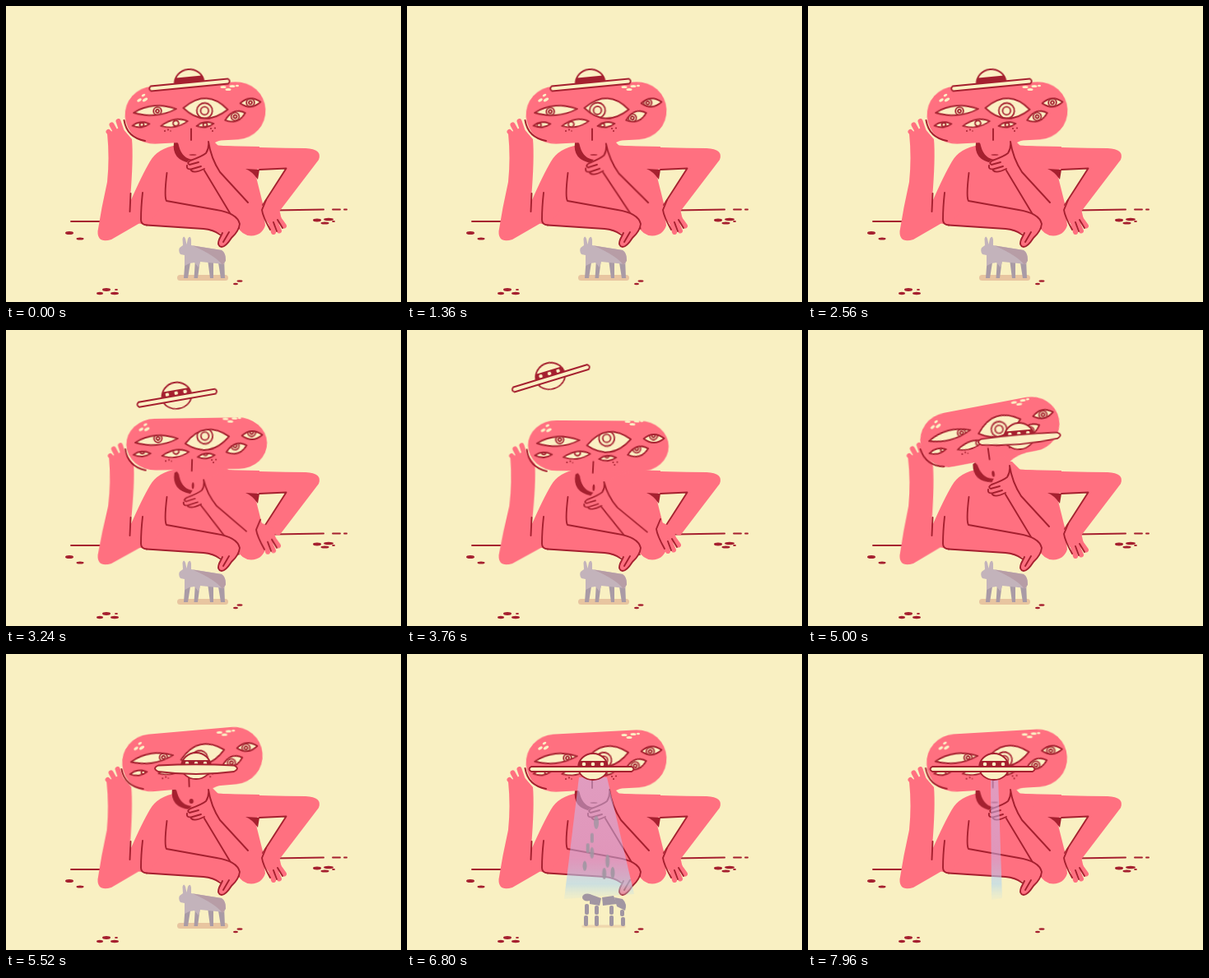
An HTML page without scripts that plays this animation: 480x360 px, repeating every 8000 ms.

```html
<!DOCTYPE html>
<html lang="en">
<head>
<meta charset="utf-8">
<title>The thinker and the saucer</title>
<style>
html, body { margin: 0; width: 100%; height: 100%; overflow: hidden; background: #f9f0c2; }
svg { display: block; width: 100vw; height: 100vh; }
.pink { fill: #ff7080; }
.red { fill: #a5202f; }
.cream { fill: #fbf0c4; }
.line { fill: none; stroke: #a5202f; stroke-width: 1.9; stroke-linecap: round; stroke-linejoin: round; }
.edge { stroke: #a5202f; stroke-width: 1.8; stroke-linejoin: round; }
.finger { fill: none; stroke: #ff7080; stroke-width: 6; stroke-linecap: round; stroke-linejoin: round; }
.stone { fill: #a196a2; }

/* every part shares one 8 s clock */
.head, .pill, .arm, .chin, .palm, .ufo, .brim, .belly, .lights, .mouth, .beam,
.look-l, .look-r, .tilt, .blink, .horse, .pieces, .shade { animation: 8s ease-in-out infinite; }

.head { animation-name: head; transform-origin: 230px 130px; }
@keyframes head {
  0%, 33% { transform: translate(0, 0) rotate(0); }
  36% { transform: translate(1px, 7px) rotate(1deg); }
  43% { transform: translate(2px, 9px) rotate(2deg); }
  47%, 49.5% { transform: translate(2.5px, 11px) rotate(3deg); }
  53.5%, 64.4% { transform: translate(-9px, -6px) rotate(-8deg); }
  69% { transform: translate(-3.5px, -2px) rotate(-2deg); }
  74%, 85% { transform: translate(0, 0) rotate(0); }
  90% { transform: translate(-1px, -1px) rotate(-.8deg); }
  100% { transform: translate(-.5px, -.5px) rotate(-.3deg); }
}
.pill { animation-name: pill; transform-origin: 230px 130px; }
@keyframes pill {
  0%, 33%, 69%, 100% { transform: scaleY(1); }
  43%, 49.5% { transform: scaleY(.88); }
  53.5%, 64.4% { transform: scaleY(.95); }
}

.arm { animation-name: arm; transform-origin: 120px 278px; }
@keyframes arm {
  0%, 33%, 74%, 100% { transform: rotate(0); }
  43%, 49.5% { transform: rotate(1.2deg); }
  53.5%, 64.4% { transform: rotate(-.7deg); }
}

.chin { animation-name: chin; transform-origin: 297px 258px; }
@keyframes chin {
  0%, 1%, 11%, 22%, 32%, 33% { transform: translate(0, 0) rotate(0) scale(1, 1); }
  6%, 17%, 27% { transform: translate(0, 0) rotate(-2.6deg) scale(1, 1); }
  43%, 49.5% { transform: translate(-1px, 4px) rotate(-4deg) scale(1, .87); }
  53.5%, 64.4% { transform: translate(-1px, 0) rotate(0) scale(1, 1); }
  69%, 100% { transform: translate(0, 0) rotate(0) scale(1, 1); }
}

.palm { animation-name: palm; }
@keyframes palm {
  0%, 33%, 53.5%, 100% { transform: translate(0, 0); }
  43%, 49.5% { transform: translate(-8px, -6px); }
}

.ufo { animation-name: ufo; animation-timing-function: linear; }
@keyframes ufo {
  0%, 33% { transform: translate(223px, 96px) rotate(-5.5deg); }
  36% { transform: translate(222px, 102px) rotate(-4deg); }
  39% { transform: translate(215px, 88px) rotate(-8deg); }
  43% { transform: translate(196px, 74px) rotate(-13deg); }
  47% { transform: translate(174.8px, 58.8px) rotate(-17deg); }
  48.5% { transform: translate(180px, 55px) rotate(-13deg); }
  51% { transform: translate(245px, 53px) rotate(3deg); }
  53.5% { transform: translate(322px, 57px) rotate(13deg); }
  55% { transform: translate(340px, 62.8px) rotate(15deg); }
  56.5% { transform: translate(345px, 70px) rotate(9deg); }
  58.5% { transform: translate(328px, 94px) rotate(-3deg); }
  61% { transform: translate(278px, 125px) rotate(-8deg); }
  64% { transform: translate(236px, 139px) rotate(-2deg); }
  66% { transform: translate(229px, 141px) rotate(1deg); }
  69% { transform: translate(231px, 139px) rotate(0); }
  74%, 100% { transform: translate(226px, 140px) rotate(0); }
}

.brim { animation-name: brim; }
@keyframes brim {
  0%, 47% { d: path("M-47 -3Q0 -3 47 -3Q51 0 47 3Q0 3 -47 3Q-51 0 -47 -3Z"); }
  55% { d: path("M-47 -3Q0 -5 47 -3Q53 0 47 3Q0 6 -47 3Q-53 0 -47 -3Z"); }
  64%, 69% { d: path("M-46 -3.5Q0 -6 46 -3.5Q54 0 46 4Q0 10 -46 4Q-54 0 -46 -3.5Z"); }
  74%, 100% { d: path("M-75 -3Q0 -3 47 -3Q52 0 47 3Q0 3 -75 3Q-80 0 -75 -3Z"); }
}
.belly { animation-name: belly; }
@keyframes belly {
  0%, 34% { transform: scaleY(0); }
  40%, 100% { transform: scaleY(1); }
}
.lights { animation-name: lights; }
@keyframes lights {
  0%, 36% { opacity: 0; }
  40%, 100% { opacity: 1; }
}

.mouth { animation-name: mouth; }
@keyframes mouth {
  0%, 33%, 76%, 100% { rx: 4.6px; ry: .8px; }
  38%, 60% { rx: 1.4px; ry: 4px; }
  67%, 70% { rx: 2.6px; ry: 2.9px; }
}

/* --k scales a glance to the width of its eye */
.look-l { animation-name: look-l; }
@keyframes look-l {
  0%, 12%, 31%, 33% { transform: translate(0, 0); }
  14%, 18% { transform: translate(calc(var(--k) * -9px), 0); }
  21%, 25% { transform: translate(calc(var(--k) * 8px), 0); }
  38%, 49% { transform: translate(calc(var(--k) * -1px), -3px); }
  53.5%, 58% { transform: translate(calc(var(--k) * 15px), -1px); }
  64%, 100% { transform: translate(calc(var(--k) * 10px), 0); }
}
.look-r { animation-name: look-r; }
@keyframes look-r {
  0%, 12%, 31%, 33% { transform: translate(0, 0); }
  14%, 18% { transform: translate(calc(var(--k) * -9px), 0); }
  21%, 25% { transform: translate(calc(var(--k) * 8px), 0); }
  38%, 49% { transform: translate(calc(var(--k) * -1px), calc(var(--k) * -7px)); }
  53.5%, 58% { transform: translate(calc(var(--k) * 16px), calc(var(--k) * -2px)); }
  64%, 100% { transform: translate(calc(var(--k) * -3px), 1px); }
}
.tilt { animation-name: tilt; }
@keyframes tilt {
  0%, 33% { transform: rotate(0); }
  40%, 100% { transform: rotate(var(--a)); }
}
.blink { animation-name: blink; }
@keyframes blink {
  0%, 18.5%, 21%, 26.5%, 29%, 100% { transform: scaleY(1); }
  19.7%, 27.7% { transform: scaleY(.08); }
}

.beam { animation-name: beam; }
@keyframes beam {
  0%, 70% { opacity: 0; d: path("M222 150L230 150L230 152L222 152Z"); }
  70.5% { opacity: 1; d: path("M222 150L230 150L230 160L222 160Z"); }
  74.5% { opacity: 1; d: path("M209 150L243 150L273 296L193 299Z"); }
  77%, 82% { opacity: 1; d: path("M209 150L243 150L274 294L192 298Z"); }
  79.5%, 85% { opacity: 1; d: path("M209 150L243 150L276 292L191 298Z"); }
  93% { opacity: 1; d: path("M209 150L243 150L275 294L191 298Z"); }
  99%, 100% { opacity: 1; d: path("M222 150L231 150L236 297L223 299Z"); }
}

.horse { animation-name: horse; animation-timing-function: step-end; }
@keyframes horse { 0% { opacity: 1; } 74%, 100% { opacity: 0; } }
.pieces { animation-name: pieces; animation-timing-function: step-end; }
@keyframes pieces { 0% { opacity: 0; } 74%, 100% { opacity: 1; } }
.shade { animation-name: shade; transform-origin: 239px 332px; }
@keyframes shade {
  0%, 73% { transform: scale(1, 1); opacity: 1; }
  85% { transform: scale(.86, .5); opacity: .6; }
  95%, 100% { transform: scale(0, 0); opacity: 0; }
}
/* --t is the moment a stone leaves, --x its drift to the saucer */
.pieces > * { animation: rise 8s linear calc(var(--t) - 8s) infinite; }
@keyframes rise {
  0% { transform: translate(0, 0); opacity: 1; animation-timing-function: ease-in; }
  8% { transform: translate(var(--x), -135px); opacity: .7; }
  8.4% { transform: translate(var(--x), -140px); opacity: 0; }
  50% { transform: translate(0, 0); opacity: 0; }
  50.1%, 100% { transform: translate(0, 0); opacity: 1; }
}
</style>
</head>
<body>
<svg viewBox="0 0 480 360">
  <defs>
    <linearGradient id="ray" gradientUnits="userSpaceOnUse" x1="0" y1="150" x2="0" y2="299">
      <stop offset="0" stop-color="#c3c8ff" stop-opacity=".5"/>
      <stop offset=".65" stop-color="#c3bcf4" stop-opacity=".5"/>
      <stop offset=".87" stop-color="#b4d6ee" stop-opacity=".65"/>
      <stop offset="1" stop-color="#c8e4e6" stop-opacity=".1"/>
    </linearGradient>
    <clipPath id="c1"><path id="e1" d="M-26 1Q-2 -12 26 0Q0 11 -26 1Z"/></clipPath>
    <clipPath id="c2"><path id="e2" d="M-27 1Q0 -25 27 0Q0 24 -27 1Z"/></clipPath>
    <clipPath id="c3"><path id="e3" d="M-12.500 0Q0 -10 12.500 0Q0 10 -12.500 0Z"/></clipPath>
    <clipPath id="c4"><path id="e4" d="M-13 0Q2 -12 13 0Q0 11 -13 0Z"/></clipPath>
    <clipPath id="c5"><path id="e5" d="M-10.500 0Q0 -6.500 10.500 0Q0 6 -10.500 0Z"/></clipPath>
    <clipPath id="c6"><path id="e6" d="M-16.500 0Q3 -9.500 16.500 0Q0 8 -16.500 0Z"/></clipPath>
    <g id="iris" class="cream edge"><circle r="4.800"/><circle r="2"/></g>
    <clipPath id="dome"><ellipse cy="-2" rx="18" ry="17"/></clipPath>
  </defs>

  <rect width="480" height="360" fill="#f9f0c2"/>

  <!-- ground -->
  <path class="line" d="M79 262H114M326 248.500L386 247.500M397 247.500L406 247.500M411 247.500H414"/>
  <g class="red">
    <ellipse cx="77" cy="276" rx="5" ry="2"/><ellipse cx="90" cy="283" rx="4.500" ry="1.500"/>
    <ellipse cx="378" cy="260.500" rx="5" ry="1.900"/><ellipse cx="392" cy="259.500" rx="6" ry="1.700"/>
    <ellipse cx="387.500" cy="264" rx="5" ry="1.500"/><ellipse cx="398" cy="262" rx="2" ry="1"/>
    <ellipse cx="122" cy="345" rx="5" ry="1.900"/><ellipse cx="132" cy="349.500" rx="5" ry="1.700"/>
    <ellipse cx="114" cy="349.500" rx="4" ry="1.700"/><ellipse cx="134" cy="345" rx="2" ry="1"/>
    <ellipse cx="284" cy="334.500" rx="3.500" ry="1.300"/><ellipse cx="279" cy="338" rx="3" ry="1.200"/>
  </g>

  <rect class="shade" x="208" y="327" width="62" height="7" rx="3.500" fill="#e8c5a0"/>
  <g class="horse">
    <path fill="#a99ba6" d="M218 304L216 331H221L224 312ZM230 308L228.500 331H233L236 308ZM245 308L248 331H252L252 308ZM257 306L261 331H266L265 306Z"/>
    <path fill="#c3b3bb" d="M215 291L214.500 283Q216 278 218 283L219.500 290L221 283Q224 278 225 284L225 291L262 297Q267 300 267 308L265 314L236 311L234 318L229 312L223 313L217 316L217 303L212 302Q209 298 211 294Z"/>
    <path fill="#b79da6" d="M227 291.500L262 297Q267 300 267 310L263 315Q255 304 227 291.500Z"/>
  </g>

  <!-- propping arm -->
  <g class="arm">
    <path class="finger" d="M136 165L124.500 153M138 162L128.500 144.500M144 162L136.500 140"/>
    <path class="pink" d="M123 155L140 147L153 162Q155 185 151 234L166 262L128 284Q111 289 111.500 274Q116 245 123 214Q126 185 123 155Z"/>
  </g>

  <!-- torso -->
  <path class="pink" d="M208 169Q184 173 175 189Q165 206 151 238L152 262L172 267L240 271L280 267Q287 279.500 298 279.500Q311 279 315 267L312 240L304 208L308 171L258 170L248 160H208Z"/>
  <path class="line" d="M151.500 228L150.500 250M166 227Q164 245 164 260Q164 266 171 266.500"/>

  <!-- resting arm -->
  <path class="pink" d="M250 168Q262 172 364 173Q385 174 380 187L332 250L312 244L340.500 197.500L290 199Z"/>
  <path class="line" d="M308 199L340.500 197.500L312 242"/>
  <path class="red" d="M291 198L308 199L306 211Q299 201 291 198Z"/>
  <g class="palm">
    <path class="finger" d="M318 249L325 275M321 249L332 273.500M324 248L338 267.500"/>
    <path class="pink" d="M314 238L332 247L336 264L320 266Q312 256 310 248Z"/>
    <path class="line" d="M316 236L311 248Q312 256 321 272M325 263L329 274M330 260L336 270"/>
  </g>

  <g class="head">
    <path class="red" d="M204 166Q201 187 224 191L230 182L209 163Z"/>
    <path class="pink" d="M190 158Q209 161 210 170Q214 186 228 187Q244 188 246 174Q249 165 270 161L255 145H200Z"/>
    <g class="pill"><rect class="pink" x="144.500" y="95" width="171" height="70" rx="35" transform="rotate(-3 230 130)"/></g>
    <path class="line" d="M143.500 139Q147 160 169 164M225 149.500V163"/>
    <ellipse class="mouth red" cx="227" cy="181" rx="4.600" ry=".8"/>
    <g class="cream">
      <ellipse cx="162" cy="114.500" rx="3" ry="1.700" transform="rotate(-28 162 114.500)"/>
      <ellipse cx="169" cy="114" rx="3.500" ry="1.700" transform="rotate(-30 169 114)"/>
      <ellipse cx="167" cy="108.500" rx="2.500" ry="1.400" transform="rotate(-30 167 108.500)"/>
      <ellipse cx="264" cy="98.500" rx="3.500" ry="1.500"/>
      <ellipse cx="270" cy="101.500" rx="3.500" ry="1.500"/>
      <ellipse cx="275" cy="97.500" rx="3.500" ry="1.500"/>
      <ellipse cx="281" cy="97" rx="2" ry="1.200"/>
    </g>
    <g class="red">
      <circle cx="193" cy="152" r="1"/><circle cx="197" cy="150.500" r="1"/><circle cx="200" cy="152" r=".8"/>
      <circle cx="249" cy="149" r="1"/><circle cx="254" cy="148.500" r="1"/><circle cx="251" cy="152" r="1"/>
    </g>

    <g transform="translate(181 127) rotate(-4)"><g class="tilt" style="--a:-2deg"><g class="blink">
      <use href="#e1" class="cream"/>
      <g clip-path="url(#c1)"><g class="look-l" style="--k:1.1"><use href="#iris" x="3" y="1"/></g></g>
      <use href="#e1" class="line"/>
    </g></g></g>
    <g transform="translate(242.500 124.500) rotate(3)"><g class="tilt" style="--a:-13deg"><g class="blink">
      <use href="#e2" class="cream"/>
      <g clip-path="url(#c2)"><g class="look-r" style="--k:1.1"><g class="cream edge"><circle cx="-1" cy="3" r="9.500"/><circle cx="-1" cy="3" r="4.800"/></g></g></g>
      <use href="#e2" class="line"/>
    </g></g></g>
    <g transform="translate(297 117.500) rotate(-4)"><g class="blink">
      <use href="#e3" class="cream"/>
      <g clip-path="url(#c3)"><g class="look-r" style="--k:.5"><use href="#iris"/></g></g>
      <use href="#e3" class="line"/>
    </g></g>
    <g transform="translate(278.500 134.500) rotate(-20)"><g class="blink">
      <use href="#e4" class="cream"/>
      <g clip-path="url(#c4)"><g class="look-r" style="--k:.55"><use href="#iris"/></g></g>
      <use href="#e4" class="line"/>
    </g></g>
    <g transform="translate(164 144.500) rotate(-6)"><g class="blink">
      <use href="#e5" class="cream"/>
      <g clip-path="url(#c5)"><g class="look-l" style="--k:.5"><circle class="edge cream" cx="1" r="2.500"/></g></g>
      <use href="#e5" class="line"/>
    </g></g>
    <g transform="translate(204.500 143) rotate(-10)"><g class="blink">
      <use href="#e6" class="cream"/>
      <g clip-path="url(#c6)"><g class="look-l" style="--k:.8"><circle class="edge cream" cx="2" r="3.500"/></g></g>
      <use href="#e6" class="line"/>
    </g></g>
    <g transform="translate(242 144.500) rotate(-8)"><g class="blink">
      <use href="#e5" class="cream"/>
      <g clip-path="url(#c5)"><g class="look-r" style="--k:.5"><circle class="edge cream" r="2.500"/></g></g>
      <use href="#e5" class="line"/>
    </g></g>
  </g>

  <!-- hand on chin -->
  <g class="chin">
    <path class="pink" d="M246 165Q244 178 235 183L222 188Q218 191 219 196Q221 203 229 204L243 203L262 205Z"/>
    <path class="line" d="M246 165Q247 173 243 179Q238 183 224 188Q219 191 223 193L234 190M220 194Q219 199 225 198.500L237 195M225 200Q229 204 241 198M246 165Q249 185 260 202L294 239M241 200L283 270"/>
  </g>

  <!-- lying forearm -->
  <path class="pink" d="M194 237L256 248Q281 252 284 265Q283 274 274 282Q267 293 262 293Q256 292 259 284L262 277L240 271L172 267Z"/>
  <path class="line" d="M195.500 203Q192 232 195 237L256 248Q281 252 284 265Q283 274 274 282Q267 293 262 293Q256 292 259 284L263 276M171 266.500L240 271Q252 272 260 278M271 275L264 287"/>

  <path class="beam" fill="url(#ray)" d="M222 150L230 150L230 152L222 152Z"/>

  <g class="pieces stone">
    <rect x="214" y="280" width="4" height="12" rx="2" style="--t:6.45s;--x:10px"/>
    <rect x="221" y="280" width="4" height="12" rx="2" style="--t:6.4s;--x:4px"/>
    <ellipse cx="236" cy="295" rx="3" ry="8" style="--t:6.3s;--x:-9px"/>
    <ellipse cx="251" cy="297" rx="2.500" ry="8" style="--t:6.47s;--x:-22px"/>
    <ellipse cx="212" cy="296" rx="2.500" ry="6" style="--t:6.5s;--x:14px"/>
    <ellipse cx="243" cy="297" rx="2.500" ry="7" style="--t:6.54s;--x:-15px"/>
    <ellipse cx="257" cy="300" rx="2.500" ry="7" style="--t:6.52s;--x:-28px"/>
    <ellipse cx="223" cy="299" rx="2.500" ry="7" style="--t:6.42s;--x:4px"/>
    <ellipse cx="219" cy="296" rx="6" ry="4.500" transform="rotate(20 219 296)" style="--t:6.9s;--x:8px"/>
    <path d="M222 292L236 297L234 306L222 304Z" style="--t:6.95s;--x:0px"/>
    <path d="M237 296L251 294L255 304L238 306Z" style="--t:7s;--x:-15px"/>
    <path d="M252 296L262 298Q268 304 265 312L255 307Z" style="--t:6.88s;--x:-30px"/>
    <rect x="216" y="304" width="5" height="13" rx="2" style="--t:7s;--x:8px"/>
    <rect x="215" y="318" width="5" height="13" rx="2" style="--t:7.1s;--x:8px"/>
    <rect x="228" y="306" width="5" height="11" rx="2" style="--t:6.92s;--x:-4px"/>
    <rect x="228" y="318" width="5" height="13" rx="2" style="--t:7.06s;--x:-4px"/>
    <rect x="246" y="306" width="5" height="11" rx="2" style="--t:7.02s;--x:-20px"/>
    <rect x="246" y="318" width="5" height="13" rx="2" style="--t:7.12s;--x:-20px"/>
    <rect x="259" y="311" width="5" height="8" rx="2" style="--t:6.96s;--x:-32px"/>
    <rect x="260" y="320" width="5" height="11" rx="2" style="--t:7.08s;--x:-32px"/>
  </g>

  <!-- hat that turns saucer -->
  <g class="ufo">
    <path class="belly cream edge" d="M-18 -2A18 15 0 0 0 18 -2Z"/>
    <path class="cream edge" d="M-18 -2A18 17 0 0 1 18 -2Z"/>
    <rect class="red" x="-18" y="-10" width="36" height="9" clip-path="url(#dome)"/>
    <g class="lights cream"><circle cx="-11" cy="-6" r="2.300"/><circle cy="-6" r="2.300"/><circle cx="11" cy="-6" r="2.300"/></g>
    <path class="brim cream edge" d="M-47 -3Q0 -3 47 -3Q51 0 47 3Q0 3 -47 3Q-51 0 -47 -3Z"/>
  </g>
</svg>
</body>
</html>
```
